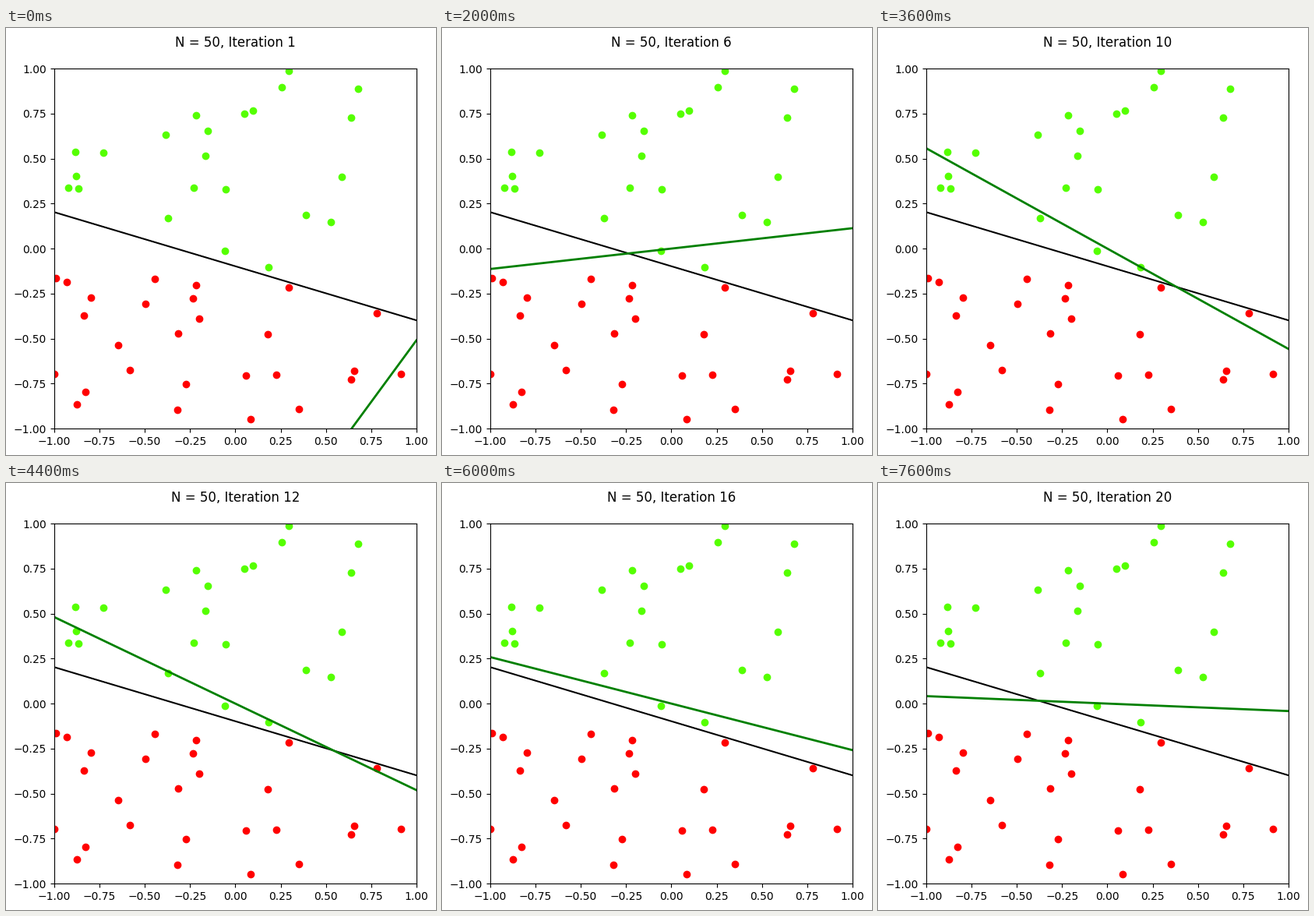
Recreate the animation shown at these times as a matplotlib script. Size 552 px wide and 548 px high, loop 8000 ms.

```python
import random

import numpy as np
import matplotlib.pyplot as plt
from matplotlib.animation import FuncAnimation

WIDTH, HEIGHT, DPI = 552, 548, 100
INTERVAL = 400
SLOPE, OFFSET = -0.3005, -0.098  # true boundary
ABOVE, BELOW = 23, 27
GAP = 0.1  # free strip along the boundary

# Points that drive the learning: upper case above the boundary, lower case below
KEYS = {
    "A": (-.729, .532), "B": (-.865, .333), "C": (-.056, -.013), "D": (.183, -.104),
    "a": (-.929, -.186), "b": (-.834, -.372), "c": (-.232, -.275), "d": (-.198, -.390),
    "e": (.297, -.214), "f": (.639, -.727), "g": (.783, -.361),
}
# Misclassified point chosen for each update
PICKS = "AbCeaBDbDdDeDfCcCgCc"


def side(name):
    return 1 if name.isupper() else -1


def random_point(sign, rng):
    """Uniform point on one side of the boundary."""
    while True:
        x, y = rng.uniform(-1, 1), rng.uniform(-1, 1)
        if sign * (y - SLOPE * x - OFFSET) > GAP:
            return x, y


def make_points(sign, count, rng):
    points = [p for name, p in KEYS.items() if side(name) == sign]
    points += [random_point(sign, rng) for _ in range(count - len(points))]
    return np.array(points)


def train():
    """Perceptron weights (bias, x, y) after every update, starting from zero."""
    return np.cumsum([side(n) * np.array([1, *KEYS[n]]) for n in PICKS], axis=0)


rng = random.Random(7)
weights = train()
span = np.linspace(-1, 1)

fig = plt.figure(figsize=(WIDTH / DPI, HEIGHT / DPI), dpi=DPI, facecolor="white")
ax = fig.add_axes([61.9 / WIDTH, 33.9 / HEIGHT, 465 / WIDTH, 462 / HEIGHT])
ax.set(xlim=(-1, 1), ylim=(-1, 1))
ax.plot(span, SLOPE * span + OFFSET, "k-")
for sign, count, color in ((1, ABOVE, "#55ff00"), (-1, BELOW, "#ff0000")):
    ax.plot(*make_points(sign, count, rng).T, "o", color=color)
guess, = ax.plot([], [], "g-", lw=2)
title = ax.set_title("", pad=20)


def update(frame):
    bias, wx, wy = weights[frame]
    guess.set_data(span, -(bias + wx * span) / wy)
    title.set_text(f"N = {ABOVE + BELOW}, Iteration {frame + 1}")
    return guess, title


anim = FuncAnimation(fig, update, frames=len(PICKS), interval=INTERVAL,
                     repeat=True, repeat_delay=0)
plt.show()
```
